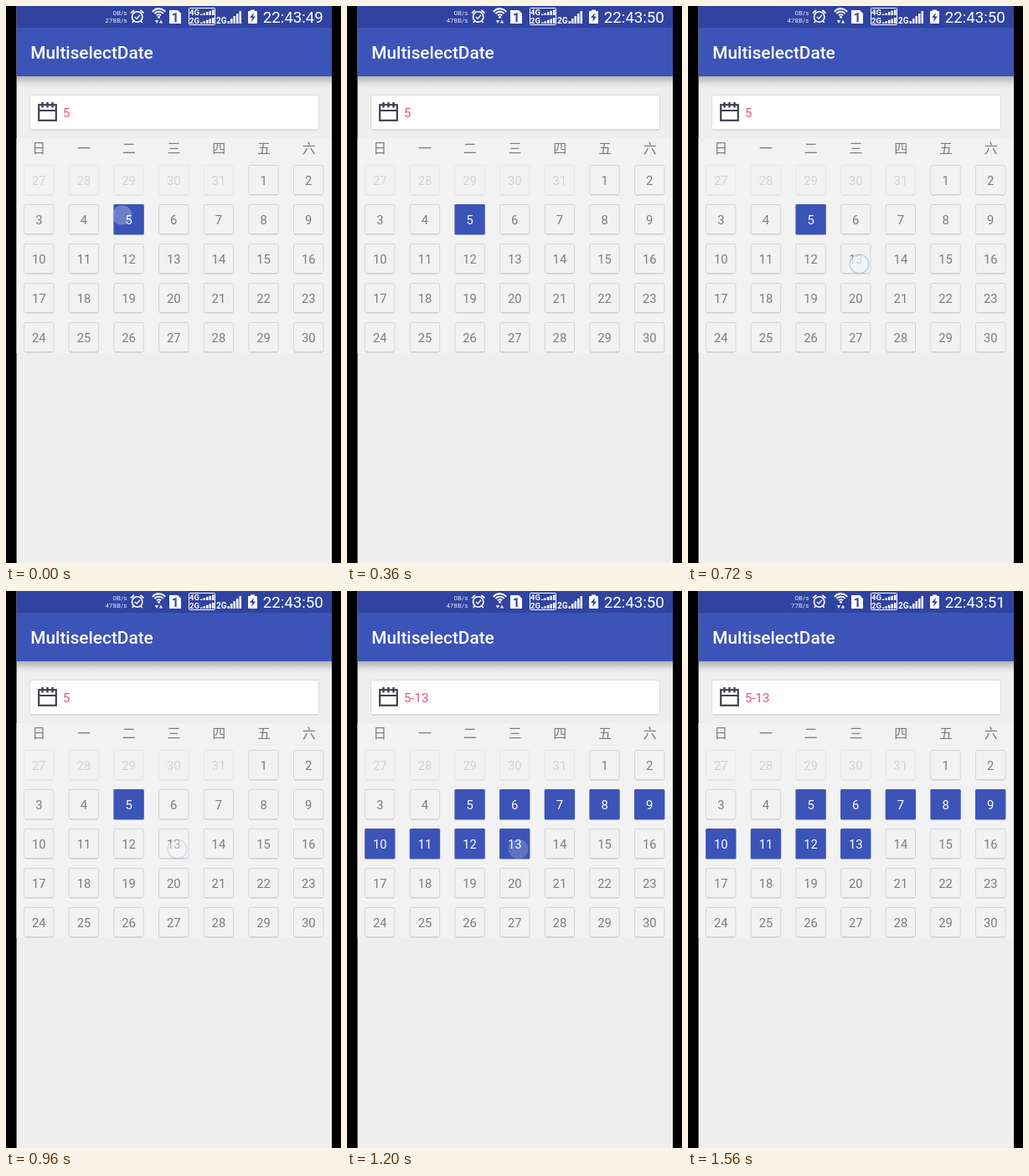
Recreate the animation shown at these times as an HTML page with a canvas. Size 400 by 666 pixels, loop 1.92 s.

```html
<!DOCTYPE html>
<html lang="zh">
<head>
<meta charset="utf-8">
<title>MultiselectDate</title>
<style>
html, body { margin: 0; width: 100%; height: 100%; overflow: hidden; background: #000; }
canvas { display: block; width: 400px; height: 666px; }
</style>
</head>
<body>
<canvas id="stage" width="400" height="666"></canvas>
<script>
const ctx = document.getElementById('stage').getContext('2d');
const LOOP = 1920, STEP = 120;
const LEFT = 12.6, WIDTH = 376.4;
const BLUE = '#3c54b7', STATUS = '#3043a1', GREY = '#7c7c7c', INK = '#40424f';
const ROBOTO = 'Roboto, sans-serif';
const CJK = '"Noto Sans CJK SC", "Noto Sans CJK", sans-serif';

function rect(x, y, w, h, color) {
  ctx.fillStyle = color;
  ctx.fillRect(x, y, w, h);
}

function roundRect(x, y, w, h, r, fill, stroke) {
  ctx.beginPath();
  ctx.roundRect(x, y, w, h, r);
  if (fill) { ctx.fillStyle = fill; ctx.fill(); }
  if (stroke) { ctx.strokeStyle = stroke; ctx.lineWidth = 1; ctx.stroke(); }
}

function text(str, x, y, size, color, align = 'left', weight = 400, family = ROBOTO) {
  ctx.font = `${weight} ${size}px ${family}`;
  ctx.textAlign = align;
  ctx.fillStyle = color;
  ctx.fillText(str, x, y);
}

function line(points, color, width) {
  ctx.beginPath();
  points.forEach(([x, y], i) => i ? ctx.lineTo(x, y) : ctx.moveTo(x, y));
  ctx.strokeStyle = color;
  ctx.lineWidth = width;
  ctx.stroke();
}

function polygon(points, color) {
  ctx.beginPath();
  points.forEach(([x, y]) => ctx.lineTo(x, y));
  ctx.fillStyle = color;
  ctx.fill();
}

function arc(x, y, r, from, to, color, width) {
  ctx.beginPath();
  ctx.arc(x, y, r, from, to);
  ctx.strokeStyle = color;
  ctx.lineWidth = width;
  ctx.stroke();
}

function disc(x, y, r, color) {
  ctx.beginPath();
  ctx.arc(x, y, r, 0, Math.PI * 2);
  ctx.fillStyle = color;
  ctx.fill();
}

function bars(x, bottom, count, pitch, height) {
  for (let i = 0; i < count; i++) {
    const h = height * (i + 1) / count;
    rect(x + i * pitch, bottom - h, pitch - 1, h, '#fff');
  }
}

function alarmIcon() {
  arc(156.7, 13, 6.2, 0, Math.PI * 2, '#fff', 1.6);
  line([[149, 8.5], [153, 5]], '#fff', 1.7);
  line([[160.4, 5], [164.4, 8.5]], '#fff', 1.7);
  line([[153.8, 13], [156.1, 15.3], [160, 10.8]], '#fff', 1.3);
  line([[152.2, 18], [150.7, 20]], '#fff', 1.4);
  line([[161.2, 18], [162.7, 20]], '#fff', 1.4);
}

function wifiIcon() {
  for (const r of [3.4, 6.8, 10.2]) {
    arc(182.5, 13.5, r, -Math.PI * 0.77, -Math.PI * 0.23, '#fff', 1.9);
  }
  disc(182.5, 13.3, 1.5, '#fff');
  polygon([[177.8, 17], [182.2, 17], [180, 21]], '#dfe4f8');
  polygon([[182.8, 20.5], [187.2, 20.5], [185, 16.5]], '#dfe4f8');
}

function statusBar(clock, speed) {
  rect(LEFT, 0, WIDTH, 26, STATUS);
  text('0B/s', 144.5, 11, 8, '#dfe4f8', 'right');
  text(speed, 144.5, 20, 8, '#dfe4f8', 'right');
  alarmIcon();
  wifiIcon();
  polygon([[195, 5], [205, 5], [209, 9], [209, 21], [195, 21]], '#fff');
  text('1', 202, 18.5, 15, STATUS, 'center', 700);

  roundRect(218.5, 2.5, 31, 20, 1, null, '#fff');
  text('4G', 219, 10.6, 9.5, '#fff', 'left', 700);
  text('2G', 219, 20.6, 9.5, '#fff', 'left', 700);
  bars(232, 11, 5, 3.5, 6.5);
  bars(232, 21, 5, 3.5, 7);
  text('2G', 251, 20.6, 10, '#fff', 'left', 700);
  bars(264.5, 21, 5, 3.5, 15);

  rect(292, 4.5, 5, 3, '#fff');
  roundRect(289, 6, 11, 15, 1, '#fff');
  polygon([[296, 8], [291, 14], [294, 14], [293, 19], [298, 12.5], [295, 12.5]], STATUS);
  text(clock, 306.7, 19.6, 18.7, '#fff');
}

function appBar() {
  rect(LEFT, 26, WIDTH, 58, BLUE);
  const shade = ctx.createLinearGradient(0, 84, 0, 98);
  shade.addColorStop(0, 'rgba(0,0,0,.25)');
  shade.addColorStop(0.35, 'rgba(0,0,0,.14)');
  shade.addColorStop(0.7, 'rgba(0,0,0,.04)');
  shade.addColorStop(1, 'rgba(0,0,0,0)');
  rect(LEFT, 84, WIDTH, 14, shade);
  text('MultiselectDate', 29.3, 63, 20.8, '#fff', 'left', 500);
}

function field(value) {
  roundRect(28.5, 106.5, 345, 41.5, 2.5, '#fefefe', '#dcdcdc');
  line([[30, 148], [372, 148]], '#cfcfcf', 1);
  ctx.strokeStyle = INK;
  ctx.lineWidth = 2.2;
  ctx.strokeRect(39.2, 118.2, 20.6, 18.6);
  line([[39, 125], [60, 125]], INK, 2);
  for (const x of [43.5, 49.5, 55.5]) line([[x, 115], [x, 121.5]], INK, 2.4);
  text(value, 68, 133, 15, '#e35387');
}

function cell(label, col, row, selected) {
  const cx = 39.3 + col * 53.65, cy = 208.3 + row * 47;
  const x = cx - 18.2, y = cy - 18.3, size = 36.4;
  const disabled = row === 0 && col < 5;
  if (selected) {
    roundRect(x, y, size, size, 1.5, BLUE);
  } else {
    roundRect(x + 0.5, y + 0.5, size - 1, size - 1, 2, '#f2f2f2', disabled ? '#e6e6e6' : '#d6d6d6');
    line([[x + 2, y + size - 0.5], [x + size - 2, y + size - 0.5]], disabled ? '#dfdfdf' : '#c6c6c6', 1);
  }
  const color = selected ? '#fff' : disabled ? '#d3d3d3' : GREY;
  text(label, cx, cy + 5.5, 14.8, color, 'center');
}

function calendar(lastDay) {
  rect(LEFT, 158, WIDTH, 257, '#f2f2f2');
  [...'日一二三四五六'].forEach((day, i) =>
    text(day, 39.3 + i * 53.75, 176, 16, GREY, 'center', 400, CJK));
  for (let i = 0; i < 35; i++) {
    const day = i - 4;
    cell(day < 1 ? day + 31 : day, i % 7, Math.floor(i / 7), day >= 5 && day <= lastDay);
  }
}

function touch(x, y, alpha) {
  if (alpha <= 0) return;
  disc(x, y, 11.3, `rgba(243,245,249,${alpha})`);
  arc(x, y, 11.3, 0, Math.PI * 2, `rgba(160,178,208,${alpha * 0.85})`, 1.4);
}

function draw(now) {
  const t = Math.floor((now % LOOP) / STEP) * STEP;
  const ranged = t >= 1080;
  const [clock, speed] = t < 360 ? ['22:43:49', '278B/s']
    : t < 1440 ? ['22:43:50', '478B/s'] : ['22:43:51', '77B/s'];

  rect(0, 0, 400, 666, '#000');
  rect(LEFT, 0, WIDTH, 666, '#eee');
  statusBar(clock, speed);
  appBar();
  field(ranged ? '5-13' : '5');
  calendar(ranged ? 13 : 5);

  touch(138.5, 250, 0.27 * (1 - t / 360));
  if (t >= 720) touch(204.5, 308.5, 0.7 * Math.max(0, 1 - (t - 720) / 720) ** 1.2);

  requestAnimationFrame(draw);
}

requestAnimationFrame(draw);
</script>
</body>
</html>
```
